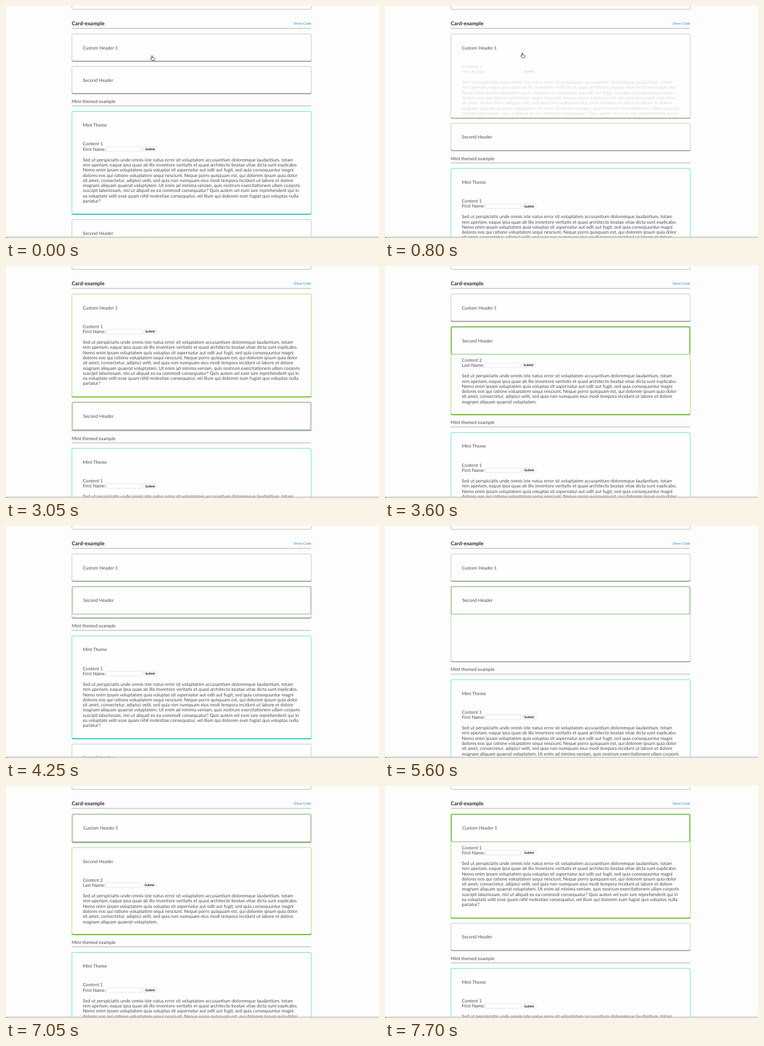
An HTML page that plays this animation: 600x373 px, repeating every 8000 ms.

```html
<!DOCTYPE html>
<html lang="en">
<head>
<meta charset="utf-8">
<title>Card example</title>
<style>
  html, body { margin: 0; width: 100%; height: 100%; overflow: hidden; background: #fdfdfd; }
  svg { display: block; width: 100%; height: 100%; }
  text { font: 7.33px Lato, sans-serif; fill: #4a4a4a; text-rendering: geometricPrecision; }
  .title { font-size: 8.5px; font-weight: 700; fill: #2b2b2b; }
  .link { font-size: 5.7px; fill: #2b8fd2; text-anchor: end; }
  .button { font: 5.1px "Liberation Sans", Arial, sans-serif; fill: #111; stroke: #111; stroke-width: .12; }
  .rule { stroke: #a6a6a6; stroke-width: .9; }
  .frame { fill: none; stroke-width: .9; }
  .base { fill: none; stroke-width: 1.5; }
  .ring { fill: none; stroke-width: 1.3; }
  .field { fill: #fff; stroke: #dedede; stroke-width: .7; }
  .halo { fill: none; stroke: #7fb4ea; stroke-width: 1.4; opacity: 0; }
</style>
</head>
<body>
<svg id="stage" viewBox="0 0 600 373" preserveAspectRatio="none"></svg>
<script>
const LOOP = 8000;
const SLIDE = 405;
const HEADER = 44;
const GAP = 8;
const LINE = 8.28;
const FOCUS_GROWTH = 2;

const opening = [
  'Sed ut perspiciatis unde omnis iste natus error sit voluptatem accusantium doloremque laudantium, totam',
  'rem aperiam, eaque ipsa quae ab illo inventore veritatis et quasi architecto beatae vitae dicta sunt explicabo.',
  'Nemo enim ipsam voluptatem quia voluptas sit aspernatur aut odit aut fugit, sed quia consequuntur magni',
  'dolores eos qui ratione voluptatem sequi nesciunt. Neque porro quisquam est, qui dolorem ipsum quia dolor',
  'sit amet, consectetur, adipisci velit, sed quia non numquam eius modi tempora incidunt ut labore et dolore',
];
const longText = [...opening,
  'magnam aliquam quaerat voluptatem. Ut enim ad minima veniam, quis nostrum exercitationem ullam corporis',
  'suscipit laboriosam, nisi ut aliquid ex ea commodi consequatur? Quis autem vel eum iure reprehenderit qui in',
  'ea voluptate velit esse quam nihil molestiae consequatur, vel illum qui dolorem eum fugiat quo voluptas nulla',
  'pariatur?'];
const shortText = [...opening, 'magnam aliquam quaerat voluptatem.'];

const GRAY = ['#c3c3c3', '#999'];
const GREEN = ['#a2dc66', '#55b80f'];
const MINT = ['#55dfdc', '#17c4c0'];

// When each card toggles; lead is how far the slide is along at its first picture.
const toggles = {
  first: [
    { at: 700, open: true, lead: 50 },
    { at: 3250, open: false },
    { at: 7250, open: true, lead: 50 },
  ],
  second: [
    { at: 3250, open: true, lead: 50 },
    { at: 4000, open: false },
    { at: 5600, open: true, lead: 162 },
    { at: 6050, open: false },
    { at: 6450, open: true, lead: 50 },
    { at: 7250, open: false },
  ],
};
const focusSteps = [
  { at: 0, on: 'none' },
  { at: 1600, on: 'input' },
  { at: 2200, on: 'submit' },
  { at: 2700, on: 'second' },
  { at: 7000, on: 'first' },
];

const clamp = v => Math.min(1, Math.max(0, v));
const easeOut = k => 1 - (1 - clamp(k)) ** 3;
const latest = (steps, t) => steps.filter(s => s.at <= t).pop();
const label = (x, y, text, cls = '') => `<text x="${x}" y="${y}" class="${cls}">${text}</text>`;
const rule = y => `<path class="rule" d="M105.7 ${y}H491"/>`;
const basePath = h => `M106.2 ${h - 1.6}q.2 1.4 2 1.4h380.6q1.8 0 2-1.4`;

function frame(id, [side, base], h = HEADER) {
  return `<g id="${id}"><rect class="frame" x="106" width="385" height="${h}" rx="2" stroke="${side}"/>
    <path class="base" d="${basePath(h)}" stroke="${base}"/></g>`;
}

function content(number, name, x, lines) {
  const box = (dx, w, cls, extra = '') =>
    `<rect x="${x + dx}" y="56.8" width="${w}" height="7.6" class="${cls}" ${extra}/>`;
  return label(123.5, 54.9, `Content ${number}`) + label(123.5, 63.2, `${name} Name:`)
    + box(0, 56.5, 'field') + box(0, 56.5, 'halo', `id="input${number}" rx="1"`)
    + box(59.3, 22, 'field', 'rx="1.5"') + box(59.3, 22, 'halo', `id="submit${number}" rx="1.5"`)
    + label(x + 62, 62.4, 'Submit', 'button')
    + lines.map((line, i) => label(123.5, 80.2 + i * LINE, line)).join('');
}

function foldingCard(id, title, body) {
  return `<g id="${id}">
    <rect id="${id}Fill" x="106" width="385" height="${HEADER}" rx="2" fill="#fefefe"/>
    <clipPath id="${id}Clip"><rect id="${id}Window" x="100" y="0" width="400" height="${HEADER}"/></clipPath>
    <g clip-path="url(#${id}Clip)"><g id="${id}Body">${body}</g></g>
    ${frame(id + 'Gray', GRAY)}${frame(id + 'Green', GREEN)}
    <g id="${id}Ring">
      <rect class="ring" x="106.7" y=".6" width="383.6" height="44" rx="1.5" stroke="#9dc596"/>
      <path id="${id}Bright" class="ring" d="M106.7 44V2q0-1.4 1.5-1.4H488.8q1.5 0 1.5 1.4V44" stroke="#6cc038"/>
    </g>
    <g id="${id}Title">${label(123.5, 24.6, title)}</g>
  </g>`;
}

document.getElementById('stage').innerHTML = `
  <defs><linearGradient id="shade" x2="0" y2="1">
    <stop stop-color="#ccc" stop-opacity="0"/><stop offset="1" stop-color="#c6c6c6"/>
  </linearGradient></defs>
  <rect width="600" height="373" fill="#fdfdfd"/>
  <path d="M106 0V4q0 1.3 1.5 1.3H489.5q1.5 0 1.5-1.3V0" fill="#fefefe" stroke="#b8b8b8" stroke-width=".9"/>
  ${label(105.7, 31.2, 'Card-example', 'title')}${label(491, 30.2, 'Show Code', 'link')}${rule(36)}
  ${foldingCard('first', 'Custom Header 1', content(1, 'First', 161.7, longText))}
  ${foldingCard('second', 'Second Header', content(2, 'Last', 160.8, shortText))}
  <g id="lower">
    ${label(105.7, 155.9, 'Mint themed example')}${rule(160.6)}
    <g transform="translate(0 169.5)">
      <rect x="106" width="385" height="165.5" rx="2" fill="#fefefe"/>
      ${frame('mint', MINT, 165.5)}${label(123.5, 24.6, 'Mint Theme')}${content(1, 'First', 161.7, longText).replace(/ id="\w+"/g, '')}
    </g>
    <g transform="translate(0 343.5)">
      <rect x="106" width="385" height="${HEADER}" rx="2" fill="#fefefe"/>
      ${frame('mintSecond', GRAY)}${label(123.5, 24.6, 'Second Header')}
    </g>
  </g>
  <rect y="369" width="600" height="4" fill="url(#shade)"/>
  <path d="M0 372h1.5v1H0z" fill="#444"/>
  <path id="hand" d="M-1.3-3.5q.8-.7 1.3.1V-.8L3-.2q1 .3.8 1.4L3.1 4H-.9L-2.9 1.2q-.2-1 .6-.8l1 .8z"
    fill="#fff" stroke="#333" stroke-width=".8" stroke-linejoin="round"/>`;

const el = id => document.getElementById(id);
const move = (id, x, y) => el(id).setAttribute('transform', `translate(${x} ${y})`);
const fade = (id, v) => { el(id).style.opacity = v; };

function foldState(id, t) {
  const step = latest(toggles[id], t);
  if (!step) return { size: 0, tone: 0 };
  const age = t - step.at;
  const slide = easeOut((age + (step.lead ?? 0)) / SLIDE);
  return step.open
    ? { size: slide, tone: clamp((age - 50) / 250) }
    : { size: 1 - slide, tone: 1 - clamp(age / 120) };
}

// Places one card and returns its height.
function placeCard(id, y, fullSize, focused, t) {
  const { size, tone } = foldState(id, t);
  const extra = focused ? FOCUS_GROWTH : 0;
  const height = HEADER + extra + size * fullSize;
  move(id, 0, y);
  for (const part of ['Fill', 'Window']) el(id + part).setAttribute('height', height);
  for (const part of ['Gray', 'Green']) {
    const [box, base] = el(id + part).children;
    box.setAttribute('height', height);
    base.setAttribute('d', basePath(height));
  }
  move(id + 'Body', 0, extra * .9);
  move(id + 'Title', focused ? .7 : 0, focused ? .8 : 0);
  fade(id + 'Body', size ? tone : 0);
  fade(id + 'Gray', 1 - tone);
  fade(id + 'Green', tone);
  fade(id + 'Ring', focused ? 1 : 0);
  fade(id + 'Bright', tone);
  return height;
}

function render(t) {
  const focus = latest(focusSteps, t);
  const firstHeight = placeCard('first', 45, 121.7, focus.on === 'first', t);
  const secondY = 45 + firstHeight + GAP;
  const secondHeight = placeCard('second', secondY, 96, focus.on === 'second', t);
  move('lower', 0, firstHeight + secondHeight - 2 * HEADER);

  const glow = clamp((t - focus.at + 40) / 200);
  fade('input1', focus.on === 'input' ? glow : 0);
  fade('submit1', focus.on === 'submit' ? glow : 0);

  const travel = easeOut((t - 30) / 270);
  move('hand', 235.5 - 14 * travel, 83.5 - 4.3 * travel);
  fade('hand', t < 2200 ? 1 : 0);
}

const start = performance.now();
function tick() {
  render((performance.now() - start) % LOOP);
  requestAnimationFrame(tick);
}
render(0);
requestAnimationFrame(tick);
</script>
</body>
</html>
```
